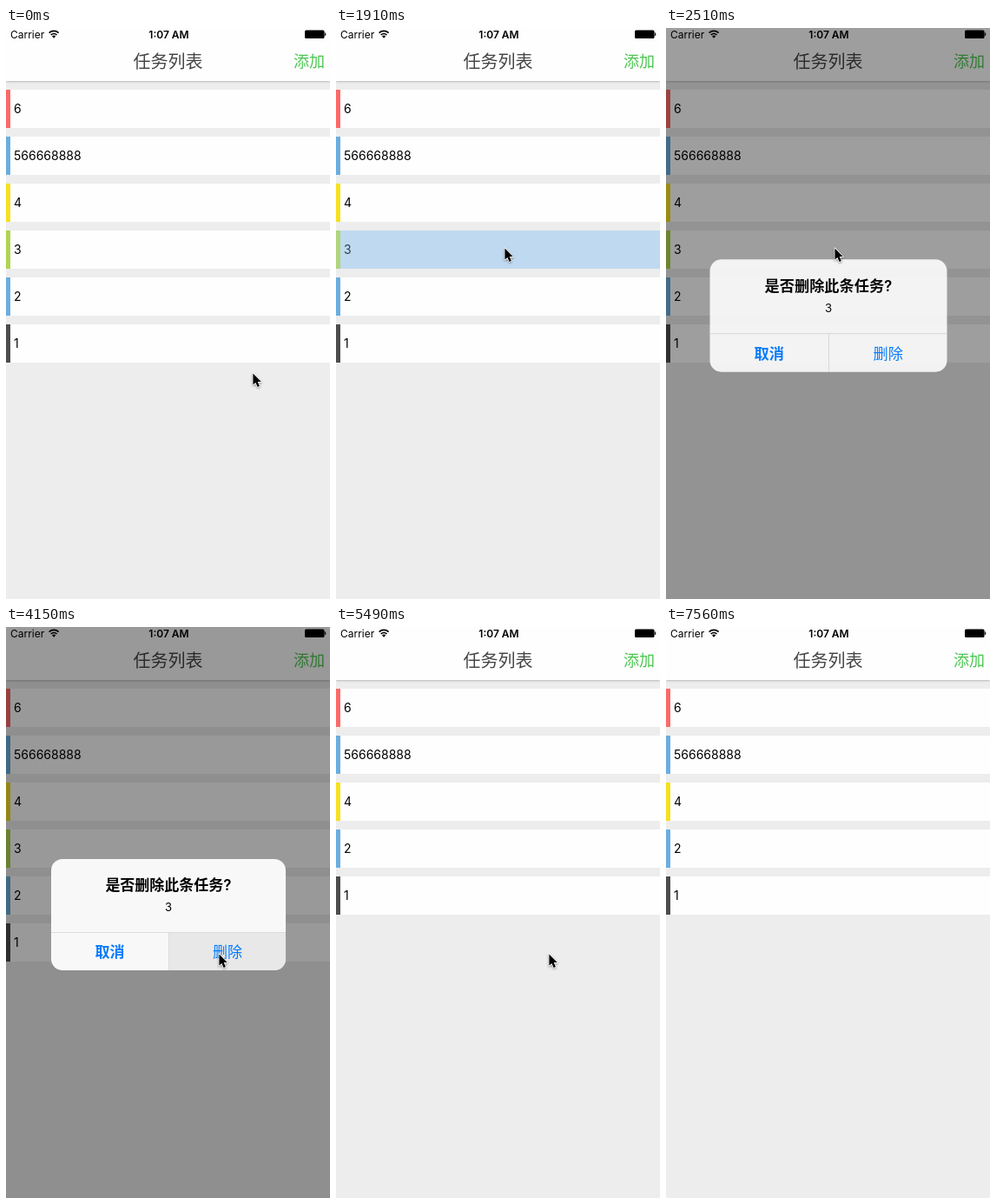
Animation of 373 by 657 pixels, one loop 9.14 s. Source, as an HTML page:

```html
<!DOCTYPE html>
<html lang="zh-CN">
<head>
<meta charset="utf-8">
<title>任务列表</title>
<style>
  html, body { margin: 0; width: 100%; height: 100%; overflow: hidden; }
  body {
    position: relative;
    background: #ededed;
    color: #000;
    font: 14px Inter, "Noto Sans CJK SC", "Noto Sans CJK", sans-serif;
  }
  header {
    position: absolute; inset: 0 0 auto; height: 61px;
    background: #fefefe;
    box-shadow: 0 0 3px rgba(0, 0, 0, .42);
  }
  header > * { position: absolute; white-space: nowrap; }
  .carrier { left: 5px; top: 0; font-size: 12px; line-height: 15px; }
  .clock { left: 0; right: 0; top: 0; text-align: center; font-size: 12px; font-weight: 600; line-height: 15px; text-indent: 2px; }
  .icons { left: 0; top: 0; }
  .title { left: 0; right: 0; top: 24px; margin: 0; text-align: center; font-size: 20px; font-weight: 400; line-height: 30px; color: #444; }
  .add { right: 6px; top: 24px; font-size: 18px; line-height: 30px; color: #4ac74f; }
  ul { position: absolute; top: 71px; left: 0; right: 0; margin: 0; padding: 0; list-style: none; }
  li {
    box-sizing: border-box; height: 44px; margin-bottom: 10px; padding-left: 4px;
    border-left: 5px solid var(--tag);
    background: #fefefe;
    line-height: 44px;
  }
  li.pressed { background: #bfdaf0; border-color: #b1d57a; color: #333f49; }
  #dim { position: absolute; inset: 0; background: #000; }
  #alert {
    position: absolute; left: 51.5px; top: 266.5px; width: 270px; height: 128px;
    border-radius: 13px; overflow: hidden;
    background: #f8f8f8;
    text-align: center;
  }
  #alert > * { position: absolute; }
  #alert h2 { left: 0; right: 0; top: 18px; margin: 0; font-size: 17px; font-weight: 600; line-height: 24px; }
  #alert p { left: 0; right: 0; top: 46px; margin: 0; font-size: 13px; line-height: 19px; }
  .button {
    box-sizing: border-box; top: 83.5px; width: 135px; height: 44.5px;
    border-top: 1px solid #dcdcdc;
    font-size: 17px; line-height: 44px; color: #007aff;
  }
  .cancel { left: 0; font-weight: 600; }
  .delete { left: 135px; border-left: 1px solid #dcdcdc; }
  .delete.pressed { background: #e8e8e8; }
  #cursor { position: absolute; left: -4px; top: -4px; overflow: visible; filter: drop-shadow(0 1px 1px rgba(0, 0, 0, .4)); }
</style>
</head>
<body>
<header>
  <span class="carrier">Carrier</span>
  <span class="clock">1:07 AM</span>
  <svg class="icons" width="373" height="15">
    <g fill="none" stroke="#000" stroke-width="1.7">
      <path d="M49.6 5.6a8 8 0 0 1 11 0"/>
      <path d="M51.7 8a5 5 0 0 1 6.8 0"/>
    </g>
    <path d="M53 9.6a3 3 0 0 1 4.2 0L55.1 11.8Z"/>
    <rect x="344" y="2.5" width="22.5" height="9.5" rx="1.6"/>
    <path d="M367.2 5.4q1.8 1.8 0 3.7Z" stroke="#000" stroke-width=".6"/>
  </svg>
  <h1 class="title">任务列表</h1>
  <span class="add">添加</span>
</header>
<ul>
  <li style="--tag:#fb6a68">6</li>
  <li style="--tag:#6aaee0">566668888</li>
  <li style="--tag:#f6e01f">4</li>
  <li style="--tag:#aed64c" id="task">3</li>
  <li style="--tag:#6aaee0">2</li>
  <li style="--tag:#4d4d4d">1</li>
</ul>
<div id="dim"></div>
<div id="alert">
  <h2>是否删除此条任务?</h2>
  <p>3</p>
  <div class="button cancel">取消</div>
  <div class="button delete" id="confirm">删除</div>
</div>
<svg id="cursor" width="20" height="24" viewBox="-4 -4 20 24">
  <path d="M.4.4V13.6L3.4 10.9 5.6 16 7.9 15 5.7 10.1H9.8Z" stroke="#fff" stroke-width="1.6" stroke-linejoin="round" paint-order="stroke"/>
</svg>
<script>
  const LOOP = 9140;
  const $ = id => document.getElementById(id);
  const [task, dim, alertBox, confirmButton, cursor] =
    ["task", "dim", "alert", "confirm", "cursor"].map($);

  // Pointer poses: [time, x, y], each held until the next
  const pointer = [
    [0, 284, 397], [140, 282, 403], [290, 276, 418], [430, 273, 426],
    [730, 266, 408], [880, 238, 345], [1020, 198, 258], [1170, 165, 204],
    [1320, 157, 195], [1460, 180, 233], [1610, 194, 253],
    [2650, 197, 259], [2800, 208, 284], [2950, 224, 322], [3100, 240, 360],
    [3250, 250, 384], [3400, 253, 391], [3550, 248, 381], [3700, 245, 376],
    [6240, 251, 389], [6380, 253, 393], [6530, 262, 412], [6680, 290, 475],
    [6820, 323, 562], [6970, 332, 610], [7110, 338, 628], [7260, 343, 637],
    [7410, 343, 643], [7560, 350, 700]
  ];

  // Alert poses: [time, shade, opacity, scale]
  const dialog = [
    [0, 0, 0, 1], [2360, .13, .32, 1.14], [2510, .38, .95, 1.011],
    [2650, .4, 1, 1], [5340, .15, .37, 1], [5490, 0, 0, 1]
  ];

  const poseAt = (track, t) => track.findLast(([start]) => start <= t).slice(1);
  const between = (t, from, to) => t >= from && t < to;

  function draw() {
    const t = performance.now() % LOOP;
    const [x, y] = poseAt(pointer, t);
    const [shade, opacity, scale] = poseAt(dialog, t);
    cursor.style.transform = `translate(${x}px, ${y}px)`;
    dim.style.opacity = shade;
    alertBox.style.opacity = opacity;
    alertBox.style.transform = `scale(${scale})`;
    task.classList.toggle("pressed", between(t, 1910, 2360));
    task.style.display = t >= 5490 ? "none" : "";
    confirmButton.classList.toggle("pressed", between(t, 4000, 5340));
    requestAnimationFrame(draw);
  }
  draw();
</script>
</body>
</html>
```
